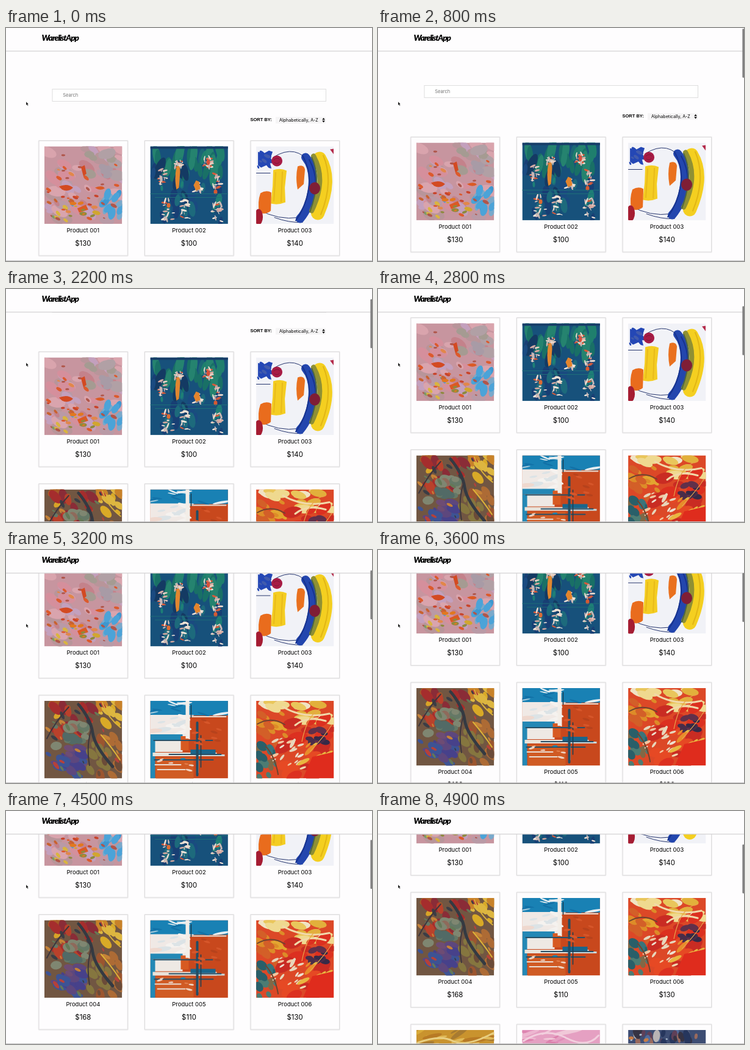
Write an HTML page that moves like this. It is 600 px wide and 383 px high and loops after 5 s.

```html
<!DOCTYPE html>
<html lang="en">
<head>
<meta charset="utf-8">
<title>Product list</title>
<style>
  html, body { margin: 0; width: 100%; height: 100%; overflow: hidden; background: #fefdfe; }
  svg { display: block; width: 100vw; height: 100vh; font-family: Inter, "Liberation Sans", sans-serif; }
  .logo { font: italic 900 13.5px Lato, sans-serif; letter-spacing: -1.1px; }
  .hint { font-size: 7.5px; fill: #757575; }
  .sort { font: bold 7.5px "Liberation Sans", Arial, sans-serif; }
  .choice { font-size: 7.15px; }
  .name { font-size: 9.5px; text-anchor: middle; }
  .price { font-size: 11.4px; text-anchor: middle; }
</style>
</head>
<body>
<svg id="stage" viewBox="0 0 600 383" preserveAspectRatio="none">
  <defs>
    <clipPath id="frame"><rect width="127.4" height="127.4"/></clipPath>
  </defs>
  <rect width="600" height="383" fill="#fefdfe"/>
  <g id="page">
    <rect x="76" y="100.5" width="448.5" height="20" fill="#fff" stroke="#dedede"/>
    <text class="hint" x="93.3" y="113.4">Search</text>
    <text class="sort" x="400.5" y="153">SORT BY:</text>
    <rect x="442" y="146" width="82" height="11" rx="1" fill="#f6f5f6"/>
    <text class="choice" x="448" y="154">Alphabetically, A-Z</text>
    <path d="M518.3 150.8l2.3-3 2.3 3zM518.3 152.2l2.3 3 2.3-3z"/>
    <g id="cards"></g>
  </g>
  <rect width="600" height="38" fill="#fefdfe"/>
  <rect y="37.4" width="600" height="1.2" fill="#d2d1d2"/>
  <text class="logo" x="58.5" y="21.3">WarelistApp</text>
  <rect y="382" width="600" height="1" fill="#c4c3c4"/>
  <rect id="thumb" x="597.4" width="3" height="80.5" rx="1.4" fill="#7e7e7e"/>
  <path d="M33 121v6l1.4-1.1 1 2 1-.5-1-1.9h1.6z" stroke="#fff" stroke-width=".4"/>
</svg>
<script>
const SIZE = 127.4, LOOP = 5000, STEP = 100;

const rect = (fill, x, y, w, h) =>
  `<rect x="${x}" y="${y}" width="${w}" height="${h}" fill="${fill}"/>`;
const oval = (fill, x, y, rx, ry = rx, turn = 0) =>
  `<ellipse cx="${x}" cy="${y}" rx="${rx}" ry="${ry}" fill="${fill}" transform="rotate(${turn} ${x} ${y})"/>`;
const shape = (fill, d) => `<path d="${d}" fill="${fill}"/>`;
const line = (color, width, d) =>
  `<path d="${d}" fill="none" stroke="${color}" stroke-width="${width}" stroke-linecap="round"/>`;
const base = fill => rect(fill, 0, 0, SIZE, SIZE);

function random(seed) {
  return () => (seed = (seed * 16807) % 2147483647) / 2147483647;
}

// Short brush marks scattered over a box
function dabs(seed, count, colors, x, y, w, h, rx, ry, turn = 0) {
  const rnd = random(seed * 7919), list = colors.split(" ");
  return Array.from({ length: count }, () => {
    const k = 0.5 + rnd();
    return oval(list[Math.floor(rnd() * list.length)],
      (x + rnd() * w).toFixed(1), (y + rnd() * h).toFixed(1),
      (rx * k).toFixed(1), (ry * k).toFixed(1), Math.round(turn + rnd() * 50 - 25));
  }).join("");
}

// Ragged pale patch with streaks
const patch = (seed, x, y, w, h) =>
  dabs(seed, 12, "#e6cfc2 #d9a9a0 #f0e4d8 #174a72 #d75a3a", x, y, w, h, 4, 1.3) +
  dabs(seed + 1, 6, "#eadbd0 #c9b6b4", x, y, w, h, 1, 4);

const paintings = [
  () => base("#c7959f") +
    dabs(3, 60, "#d58f9c #c3a0bd #b99aa6 #d9a4ad #b8959a #c4828b", 0, 0, 127, 127, 11, 6, 30) +
    dabs(5, 14, "#a59b92 #b1a0a5 #a89ba6", 70, 8, 50, 42, 9, 6) +
    dabs(8, 18, "#4ba3d8 #3f97cf #79a9cb", 96, 78, 30, 36, 7, 4, -60) +
    dabs(9, 12, "#5c9cc4 #d9b540 #7f9a66 #c9622f", 2, 84, 45, 38, 4, 2, 50) +
    dabs(11, 32, "#dc5a2c #c9442a #e2874a #b0564a", 4, 6, 120, 118, 4, 2, 20) +
    shape("#d34a22", "M60 34l6-3 3 14-5 4zM24 66q14-6 23 2q-8 8-18 3z") +
    shape("#db5a24", "M83 68q12-5 16 1q-8 5-16-1zM54 102l14-6 4 8-15 5z") +
    dabs(14, 9, "#d1a62f #8d8a3e #e2781f", 42, 88, 46, 30, 5, 2.5),

  () => base("#17517b") +
    dabs(21, 30, "#1f7f6d #197066 #25836f #1c6775", 2, 2, 122, 50, 5, 15) +
    dabs(22, 16, "#183f74 #1a4a80 #143a63", 0, 28, 127, 98, 5, 13) +
    dabs(23, 12, "#1d7f76 #1d6a7c", 4, 60, 120, 50, 4, 9) +
    rect("#173d68", 0, 0, 127.4, 4) +
    patch(31, 13, 38, 13, 26) + patch(33, 88, 16, 13, 20) +
    patch(35, 70, 58, 13, 18) + patch(37, 103, 44, 13, 26) +
    patch(39, 20, 87, 18, 34) + patch(41, 50, 88, 14, 36) + patch(43, 102, 90, 15, 34) +
    patch(45, 40, 24, 12, 12) +
    shape("#e08730", "M43 34q6-6 6 8l-2 26-4 3q-4-18 0-37z") +
    shape("#e2842d", "M75 56l5 2 2 12-7 3-4-9z") +
    oval("#d8503a", 95, 26, 3, 5) + oval("#d65a32", 107, 75, 3, 4) + oval("#dc6b35", 30, 97, 3, 4) +
    line("#1e6f79", 1.2, "M0 78H127M8 84H118"),

  () => base("#f1f2f7") +
    line("#26356d", 1, "M28 18Q66 -6 90 30M0 44H23M4 104Q36 122 70 117M30 117Q54 126 76 125") +
    shape("#2447b5", "M3 9l9 3 9-5 6 2-5 15 3 13-8-6-9 4-5-4z") +
    dabs(52, 9, "#2447b5 #415bad", 3, 8, 20, 27, 4, 2, 45) +
    shape("#f4cd22", "M28 39q12-4 22 1l-3 28 1 24q-12 5-24 2l3-28z") +
    line("#e8ba1a", 2, "M32 43L29 90M43 42L41 91") +
    shape("#e96c1d", "M7 77q10-6 18-1l-1 30q-8 7-19 3-3-18 2-32z") +
    oval("#a51c32", 4, 116, 7, 13) +
    shape("#e9711f", "M68 33q10-4 12 5l-2 24-10 9q-4-20 0-38z") +
    line("#2346ae", 14, "M81 18Q96 36 92 69Q88 101 72 119") +
    line("#17338f", 2, "M76 15Q91 42 86 71T65 122M87 22Q102 49 96 80") +
    line("#f4cf20", 22, "M104 20Q125 55 101 110") +
    line("#8f9034", 8, "M94 16Q116 55 91 106") +
    line("#4d6641", 2, "M91 18Q108 53 88 108") +
    line("#e1b515", 2, "M110 15Q128 58 106 112") +
    oval("#a71c45", 34, 24, 9) + line("#7e1738", 1, "M29 22q6-5 10 0M30 27q5 3 8-1") +
    oval("#7f1e36", 96, 69, 9, 10) + shape("#b42b4b", "M121 5l6-1v9z"),

  () => base("#715642") +
    dabs(61, 16, "#d9aa27 #c88229 #ddb640", 76, 0, 52, 50, 9, 5, 55) +
    dabs(62, 10, "#d8a428 #a75a28 #c5742c", 0, 0, 38, 28, 8, 5, -30) +
    dabs(63, 18, "#a52d2d #b9412b #8a2c37", 16, 2, 65, 52, 9, 5, 55) +
    dabs(64, 18, "#657866 #7f8671 #526a66 #8e6a5b", 18, 36, 52, 38, 8, 6, 20) +
    dabs(65, 26, "#47418a #5d477d #3d5394 #6e4c73", 0, 76, 62, 50, 9, 5, 30) +
    dabs(66, 20, "#9b552f #ad6b35 #6b4b38 #85763f", 72, 46, 55, 80, 9, 5, 60) +
    dabs(67, 26, "#3b3d45 #b5413a #647857 #c58237", 4, 4, 118, 118, 5, 2, 45) +
    line("#343a42", 5, "M56 6Q76 30 79 52T112 108") +
    line("#3d363d", 2, "M40 10Q18 34 4 62M78 44Q68 72 74 106") +
    line("#dbb238", 2, "M95 3Q104 28 125 44M93 56Q111 77 124 97"),

  () => base("#c8481d") +
    rect("#1981b4", 0, 0, 127.4, 24) +
    dabs(71, 12, "#e7edf0 #9fc7da #1271a7", 0, 2, 125, 22, 10, 1.4, 0) +
    rect("#f0e9e5", 0, 23, 65, 40) +
    dabs(72, 10, "#efd8ce #f5f2ef #dce3e6", 4, 25, 55, 30, 11, 3) +
    rect("#2488b5", 0, 55, 53, 9) + rect("#eee9e4", 5, 64, 48, 20) +
    rect("#2388b5", 0, 64, 8, 63.4) + rect("#d05b24", 9, 93, 62, 35) +
    rect("#e9e3da", 4, 85, 105, 6) +
    rect("#d75a22", 50, 58, 13, 23) + rect("#f3eee8", 58, 0, 6, 62) +
    rect("#1a668c", 66, 80, 41, 7) + rect("#cbd8da", 72, 88, 50, 3) +
    line("#284f66", 2, "M6 65H102M31 88H116M7 97H103") +
    line("#e9ddd3", 2, "M65 26H124M8 105H50M12 113H57M78 96v22") +
    line("#234d63", 4, "M77 36V122") + line("#163c50", 1.5, "M83 57V109M67 7v20") +
    dabs(74, 10, "#b7421c #d6562a", 72, 30, 48, 46, 6, 2) +
    dabs(75, 7, "#e4814f #f0d2c0 #1d82ae", 10, 92, 60, 28, 5, 1.5),

  () => base("#dc4827") +
    dabs(81, 22, "#e9c65b #efd98f #e2b03b #f0e3c4", 0, 0, 127, 34, 11, 5) +
    dabs(82, 16, "#dd8c28 #e3a530 #d35f28", 0, 20, 48, 55, 9, 5, 30) +
    dabs(83, 20, "#dc3020 #e64924 #c92c23", 42, 30, 82, 94, 12, 7, -20) +
    dabs(84, 18, "#39747a #4c7c73 #295f69 #816846", 0, 68, 34, 58, 7, 5, 55) +
    dabs(85, 18, "#eee1d0 #f1c6a0 #e7d6bb", 29, 62, 48, 46, 6, 2, -40) +
    dabs(86, 12, "#4a2d49 #60304a #352a47", 86, 46, 28, 23, 7, 4) +
    dabs(87, 10, "#e88c2a #e9b640 #f0d7ae", 74, 72, 50, 50, 8, 2.5, -30) +
    line("#f1d9aa", 3, "M44 10Q78 30 120 21M64 40Q83 24 114 33") +
    line("#e9a44a", 1.2, "M75 67Q85 15 114 10M89 83Q116 53 124 39") +
    line("#6e442f", 2, "M2 38Q25 25 47 39M16 75Q31 92 36 121") +
    shape("#df2c1d", "M92 92l35-8v43H77z"),

  () => base("#c9932e") +
    dabs(91, 28, "#d8aa39 #b87a25 #e0ba59 #a87b31", 0, 0, 127, 40, 14, 3, -15) +
    line("#e8cf83", 3, "M2 21Q39 7 60 18T126 5"),

  () => base("#e5a0c2") +
    dabs(95, 18, "#dc82ad #edb6d0 #e08eb9 #f0c8d8", 0, 0, 127, 40, 17, 2.5, -10) +
    line("#f2cfde", 3, "M2 18Q38 -5 72 13T125 9"),

  () => base("#3d4d73") +
    dabs(98, 42, "#26365d #536c9d #9a6a5d #b8b3b4 #5f4058 #353344", 0, 0, 127, 40, 4, 7) +
    dabs(99, 7, "#c77c45 #aebed0", 0, 0, 127, 28, 3, 2)
];

const prices = [130, 100, 140, 168, 110, 130, 125, 150, 145];

function card(price, i) {
  const x = 54 + (i % 3) * 173.6, y = 185.5 + Math.floor(i / 3) * 217;
  return `<g transform="translate(${x} ${y})">
    <rect x="-.5" y="-.5" width="146.4" height="189.8" rx="1" fill="none" stroke="#f0eff0" stroke-width="2"/>
    <rect width="145.3" height="188.5" fill="#fefdfe" stroke="#dddcdd"/>
    <g transform="translate(8.9 9)" clip-path="url(#frame)">${paintings[i]()}</g>
    <text class="name" x="72.4" y="150">Product 00${i + 1}</text>
    <text class="price" x="72.4" y="172.2">$${price}</text>
  </g>`;
}

// Time in ms and scroll distance
const keys = [[600, 0], [800, 6], [1200, 14], [1600, 40], [1800, 49],
  [2800, 138], [3600, 184.5], [4200, 209.5], [4900, 268.5]];
const slopes = keys.slice(1).map(([t, s], i) => (s - keys[i][1]) / (t - keys[i][0]));
const tangent = i => {
  const a = slopes[i - 1], b = slopes[i];
  return a && b ? 2 * a * b / (a + b) : a || b;
};

// Smooth curve through the keys that never turns back
function scrollAt(t) {
  if (t <= keys[0][0]) return 0;
  const i = Math.min(keys.findIndex(k => k[0] >= t), keys.length - 1) - 1;
  const [t0, s0] = keys[i], [t1, s1] = keys[i + 1];
  const d = t1 - t0, u = (t - t0) / d, v = 1 - u;
  return v * v * (1 + 2 * u) * s0 + u * u * (3 - 2 * u) * s1
    + d * u * v * (v * tangent(i) - u * tangent(i + 1));
}

const page = document.getElementById("page");
const thumb = document.getElementById("thumb");
document.getElementById("cards").innerHTML = prices.map(card).join("");

function draw(time) {
  const t = Math.floor((time % LOOP) / STEP) * STEP;
  const s = Math.round(scrollAt(t) * 2) / 2;
  page.setAttribute("transform", `translate(0 ${-s})`);
  thumb.setAttribute("y", (s * 0.205).toFixed(1));
  thumb.setAttribute("visibility", s > 0 ? "visible" : "hidden");
}

const start = performance.now();
function tick() {
  draw(performance.now() - start);
  requestAnimationFrame(tick);
}
tick();
</script>
</body>
</html>
```
